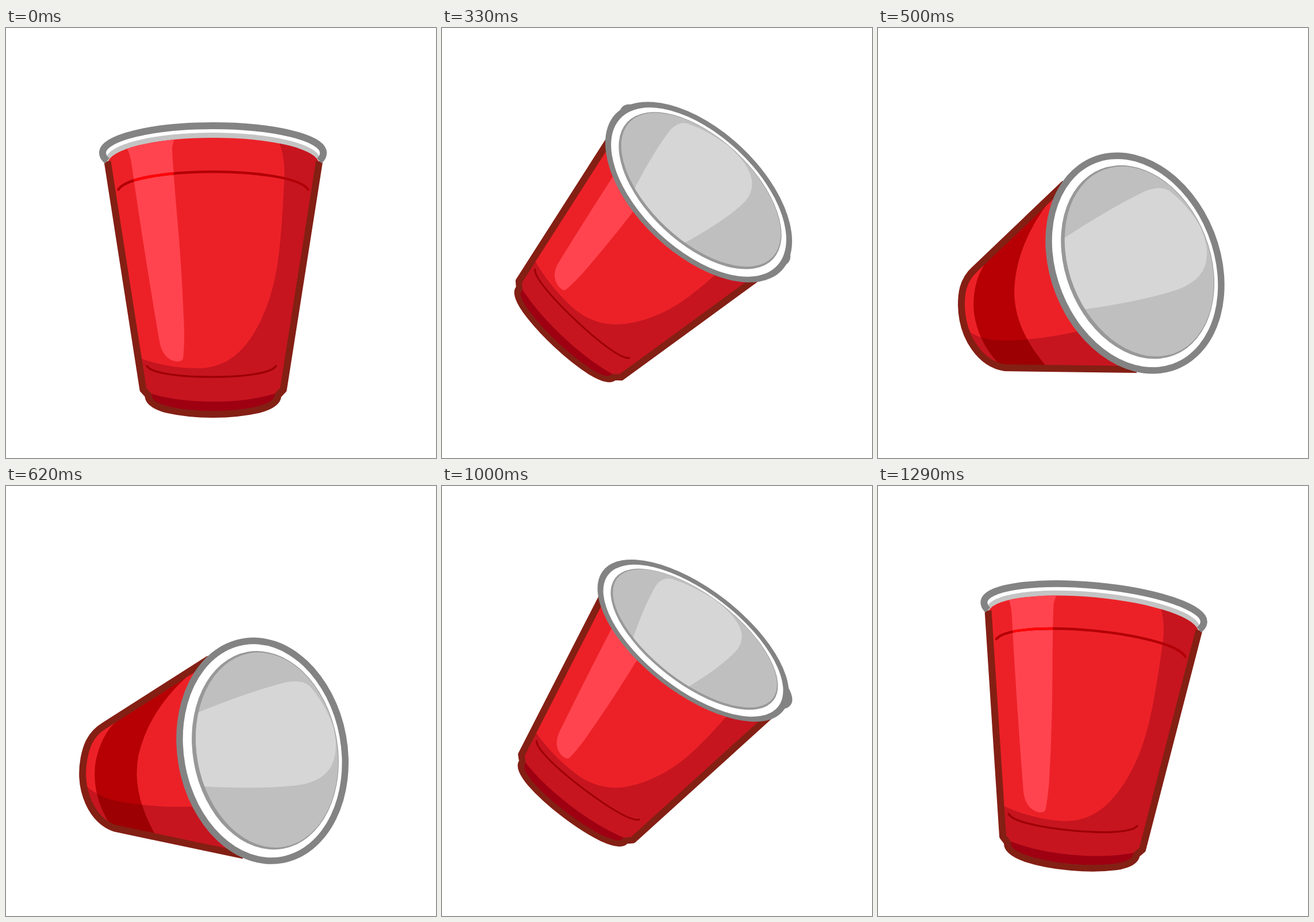
These frames come from a looping animation (748x748 px, 1330 ms). An HTML page:

```html
<!DOCTYPE html>
<html lang="en">
<head>
<meta charset="utf-8">
<title>Tipping cup</title>
<style>
  html, body { margin: 0; width: 100%; height: 100%; overflow: hidden; background: #fff; }
  svg { display: block; width: 100vw; height: 100vh; }
  .red { fill: #ec2127; }
  .shade { fill: #c6151f; }
  .edge { fill: none; stroke: #841f14; stroke-width: 12; stroke-linejoin: round; }
  .crease { fill: none; stroke: #b20006; stroke-linecap: round; }
</style>
</head>
<body>
<svg viewBox="0 0 748 748">
  <defs>
    <path id="wall" d="M177 236A183 45 0 0 1 544 236L482.500 629L473 639Q473 655 439 664Q404 672 360 672Q316 672 281 664Q247 655 247.500 639L238.500 629Z"/>
    <path id="shine" d="M205 200Q216 215 219 240L222 262Q243 405 266 540Q271 575 295 580Q306 581 308 575Q310 560 310 530Q307 430 297 320Q291 250 289 212Q289 200 295 190Z"/>
    <path id="fold" d="M195.500 281C210 258 300 250 360 250C420 250 510 258 525.500 281"/>
    <path id="side" d="M325 270L168 420C146 440 145 465 145 482C146 540 180 585 221 591L450 594Z"/>
    <path id="band" d="M190 405Q166 435 166 485Q170 545 216 590H294Q237 525 237 458Q240 375 300 299Z"/>
    <path id="under" d="M148 520Q175 545 225 544Q300 541 365 523L450 604H190Z"/>
    <clipPath id="inWall"><use href="#wall"/></clipPath>
    <clipPath id="inShine"><use href="#shine"/></clipPath>
    <clipPath id="inSide"><use href="#side"/></clipPath>
    <clipPath id="inBand"><use href="#band"/></clipPath>
    <clipPath id="inMouth"><ellipse cy="-8" rx="171" ry="122"/></clipPath>
  </defs>

  <g id="front">
    <path fill="#fff" d="M168 217A192 47 0 0 1 552 217L545 232H175Z"/>
    <path fill="#c4c4c4" d="M174 228A186 46 0 0 1 546 228L543 237H177Z"/>
    <use href="#wall" class="red"/>
    <g clip-path="url(#inWall)">
      <path class="shade" d="M474 196Q486 225 484 262C478 400 470 450 445 505C418 562 385 592 332 592Q280 592 230 573V690H600V190Z"/>
      <path fill="#9e0012" d="M240 632Q290 650 360 650Q430 650 480 632V690H240Z"/>
      <use href="#shine" fill="#ff444f"/>
    </g>
    <use href="#fold" class="crease" stroke-width="4.500"/>
    <g clip-path="url(#inShine)"><use href="#fold" fill="none" stroke="#ff0508" stroke-width="4.500"/></g>
    <path class="crease" style="stroke:#9e0008" stroke-width="3.500" d="M245 588C255 603 315 607 358 607C400 607 460 603 469.500 588"/>
    <path class="edge" d="M176.500 232L238.500 629L247.500 639Q247 655 281 664Q316 672 360 672Q404 672 439 664Q473 655 473 639L482.500 629L545 232"/>
    <path fill="none" stroke="#838383" stroke-width="12" d="M176 231Q168 225 168 217A192 47 0 0 1 552 217Q552 225 545 231"/>
  </g>

  <g id="back">
    <use href="#side" class="red"/>
    <g clip-path="url(#inSide)">
      <use href="#under" class="shade"/>
      <use href="#band" fill="#b60004"/>
      <g clip-path="url(#inBand)"><use href="#under" fill="#9c0003"/></g>
    </g>
    <path class="edge" d="M325 270L168 420C146 440 145 465 145 482C146 540 180 585 221 591L450 594"/>
  </g>

  <g id="mouth">
    <ellipse rx="198.500" ry="148" fill="#838383"/>
    <ellipse rx="187" ry="136.500" fill="#fff"/>
    <ellipse cy="-5" rx="174" ry="126" fill="#989898"/>
    <ellipse cy="-8" rx="171" ry="122" fill="#bfbfbf"/>
    <path clip-path="url(#inMouth)" fill="#d6d6d6" d="M-85 102Q-106 0 -110 -62Q-110 -95 -91 -104Q-60 -122 -18 -129Q18 -130 36 -120Q68 -105 70 -60Q69 0 42 114Q-30 135 -85 102Z"/>
  </g>
</svg>
<script>
const LOOP = 1330, STEP = 1000 / 24, RAD = Math.PI / 180;
const [front, back, mouth] = ["front", "back", "mouth"].map(id => document.getElementById(id));

// [step, tilt in degrees]
const TILT = [[1, 0], [4, 18.3], [8, 43.2], [12, 68.5], [13, 68.5], [15, 79.7],
              [17, 79.7], [20, 62.8], [24, 37.4], [25, 37.4], [32, 0]];
// [tilt, mouth centre x, centre y, half height]
const MOUTH = [[8, 390, 204, 24], [18.3, 417, 225, 44], [37.4, 437, 269, 90.6], [43.2, 446.5, 285.5, 107.9]];

// Linear interpolation of one column of a key list
function track(keys, x, col = 1) {
  if (x <= keys[0][0]) return keys[0][col];
  for (let i = 1; i < keys.length; i++) {
    const a = keys[i - 1], b = keys[i];
    if (x <= b[0]) return a[col] + (b[col] - a[col]) * (x - a[0]) / (b[0] - a[0]);
  }
  return keys[keys.length - 1][col];
}

const show = (el, on) => el.setAttribute("visibility", on ? "visible" : "hidden");
const place = (el, transform) => el.setAttribute("transform", transform);

function pose(tilt) {
  const rolled = tilt > 46;
  show(front, !rolled);
  show(back, rolled);
  show(mouth, tilt > 8);
  if (rolled) {
    const turn = `rotate(${tilt - 68.5} 183 430)`;
    place(back, turn);
    place(mouth, `${turn} translate(447 409) rotate(68.5)`);
  } else {
    const lift = 11 * Math.sin(2 * tilt * RAD);
    const lean = tilt + 0.06 * (43.2 - tilt);
    const [x, y, half] = [1, 2, 3].map(col => track(MOUTH, tilt, col));
    place(front, `translate(360 ${388 - lift}) rotate(${tilt}) scale(1 ${1 - 0.0038 * tilt}) translate(-360 -388)`);
    place(mouth, `translate(${x} ${y}) rotate(${lean}) scale(1 ${half / 148})`);
  }
}

function draw() {
  const t = performance.now() % LOOP;
  pose(track(TILT, Math.min(31, Math.floor((t + 7) / STEP))));
  requestAnimationFrame(draw);
}
draw();
</script>
</body>
</html>
```
